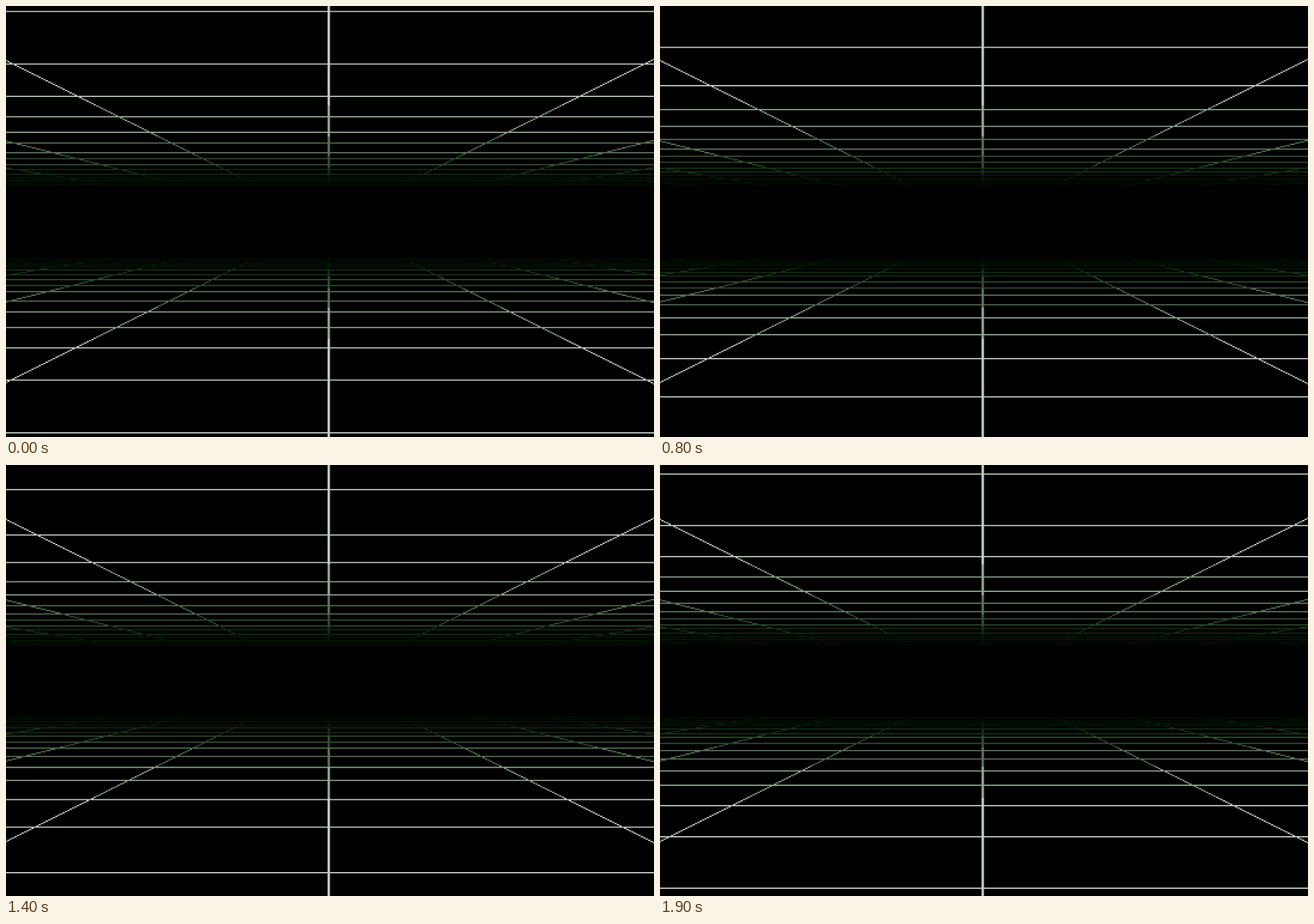
These frames come from a looping animation (917 by 611 pixels, 2000 ms). An HTML page with a canvas:

```html
<!DOCTYPE html>
<html lang="en">
<head>
<meta charset="utf-8">
<title>Neon grid corridor</title>
<style>
  html, body { margin: 0; width: 100%; height: 100%; overflow: hidden; background: #000; }
  canvas { display: block; width: 100%; height: 100%; }
</style>
</head>
<body>
<canvas id="stage" width="1080" height="720"></canvas>
<script>
const ctx = document.getElementById('stage').getContext('2d');
const WIDTH = 540, HEIGHT = 360;   // coarse pixel grid, each cell 2 x 2 canvas pixels
const HORIZON = HEIGHT / 2;
const CENTER_X = 268.5;
const SCALE = 527.25;              // screen offset from the horizon at depth 1
const LOOP = 2000, STEP = 100;
ctx.scale(2, 2);

// Fog bands: [far depth, colour]
const FOG = [
  [5.4, '#c0ccc0'], [7.4, '#90a590'], [9.5, '#587058'], [11.5, '#304c30'],
  [13.5, '#142f14'], [15.5, '#001a00'], [17.6, '#000f00'],
];

function setFog(depth) {
  const band = FOG.find(([far]) => depth < far);
  if (band) ctx.fillStyle = band[1];
  return Boolean(band);
}

function drawRails() {
  for (let d = 1; d <= HORIZON; d++) {
    if (!setFog(SCALE / d)) continue;
    ctx.fillRect(268, HORIZON - d, 2, 1);
    ctx.fillRect(268, HORIZON + d, 2, 1);
  }
  for (let rail = 1; rail <= 4; rail++) {
    for (let x = 0; x < WIDTH; x++) {
      const d = Math.abs(x - CENTER_X) / (2 * rail);
      if (!setFog(SCALE / d)) continue;
      ctx.fillRect(x, Math.floor(HORIZON - d), 1, 1);
      ctx.fillRect(x, Math.floor(HORIZON + d), 1, 1);
    }
  }
}

function drawRungs(phase) {
  for (let i = 3; i <= 18; i++) {
    const depth = i - phase;
    if (!setFog(depth)) continue;
    const d = Math.floor(SCALE / depth + 0.28);
    ctx.fillRect(0, HORIZON - d, WIDTH, 1);
    ctx.fillRect(0, HORIZON + d, WIDTH, 1);
  }
}

function draw(time) {
  const phase = Math.floor((time % LOOP) / STEP) * STEP / LOOP;
  ctx.fillStyle = '#000';
  ctx.fillRect(0, 0, WIDTH, HEIGHT);
  drawRungs(phase);
  drawRails();
}

const start = performance.now();
function tick() {
  draw(performance.now() - start);
  requestAnimationFrame(tick);
}
tick();
</script>
</body>
</html>
```
